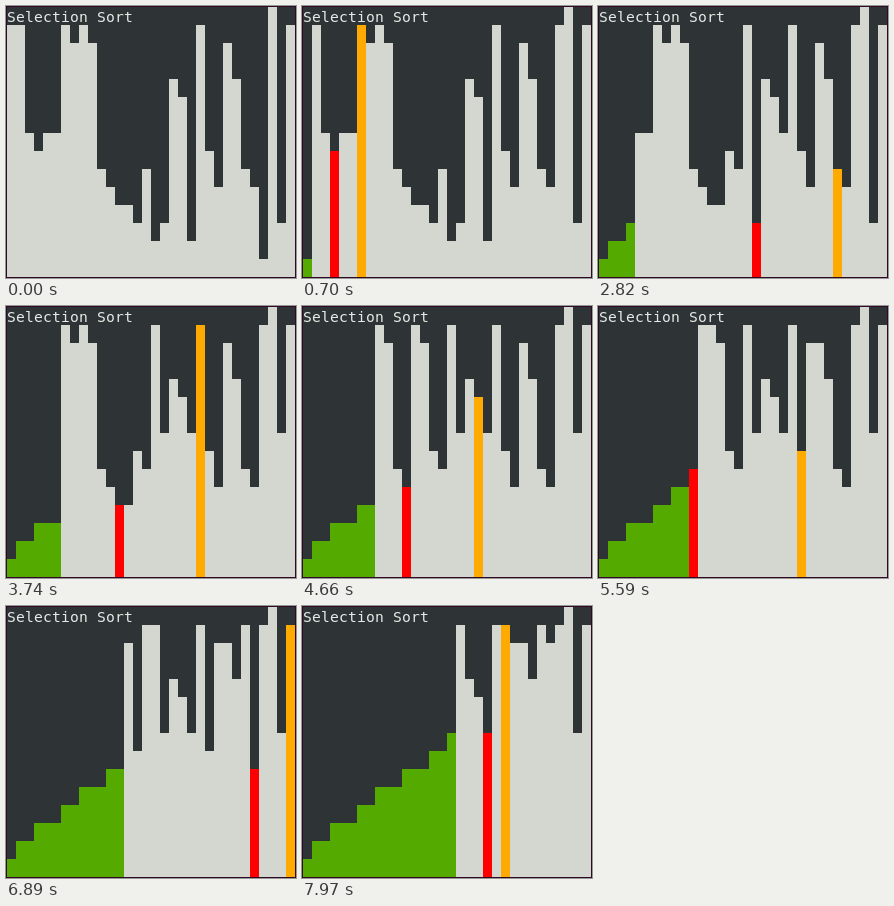
Animation of 290 by 272 pixels, one loop 8000 ms. Source, as an HTML page with a canvas:

```html
<!DOCTYPE html>
<html lang="en">
<head>
<meta charset="utf-8">
<title>Selection Sort</title>
<style>
  html, body { margin: 0; width: 100%; height: 100%; overflow: hidden; background: #300a24; }
  canvas { display: block; }
</style>
</head>
<body>
<canvas id="stage" width="290" height="272"></canvas>
<script>
const ctx = document.getElementById('stage').getContext('2d');

const LOOP = 8000, REFRESH = 42;
const CELL_W = 9, CELL_H = 18, ROWS = 15, EDGE = 1;
const COLORS = {
  border: '#300a24', back: '#2e3436', text: '#e6eae6', bar: '#d3d7cf',
  sorted: '#55aa00', min: '#ff0000', cursor: '#ffaa00'
};

// One hexadecimal digit per bar: the unsorted heights in rows.
const START = [...'ee8788eded6544362' + '3ba2e75db651f3e'].map(h => parseInt(h, 16));

// Slightly more than two comparisons per screen refresh, at a gently drifting pace.
function comparisonsAt(ms) {
  const n = Math.floor(ms / REFRESH + 0.34);
  if (n === 0) return 0;
  const drift = 0.45 * Math.sin((n - 143) / 13.4);
  return Math.floor(1 + n * (2 + 1 / 12) + drift);
}

// Runs the sort until the given comparison is about to be made.
function sortUntil(count) {
  const a = START.slice();
  if (count === 0) return { a, i: 0, min: -1, j: -1 };
  for (let i = 0; i < a.length; i++) {
    let min = i;
    for (let j = i + 1; j < a.length; j++) {
      if (--count === 0) return { a, i, min, j };
      if (a[j] < a[min]) min = j;
    }
    [a[i], a[min]] = [a[min], a[i]];
  }
  return { a, i: a.length, min: -1, j: -1 };
}

function barColor(k, { i, min, j }) {
  if (k === j) return COLORS.cursor;
  if (k === min) return COLORS.min;
  return k < i ? COLORS.sorted : COLORS.bar;
}

// Terminal text: every character starts on its own cell.
function drawTitle(text) {
  ctx.font = '11pt "DejaVu Sans Mono", monospace';
  ctx.textBaseline = 'alphabetic';
  ctx.fillStyle = COLORS.text;
  [...text].forEach((ch, k) => ctx.fillText(ch, EDGE + k * CELL_W, 16));
}

function draw(ms) {
  const state = sortUntil(comparisonsAt(ms));
  ctx.fillStyle = COLORS.border;
  ctx.fillRect(0, 0, 290, 272);
  ctx.fillStyle = COLORS.back;
  ctx.fillRect(EDGE, EDGE, START.length * CELL_W, ROWS * CELL_H);
  state.a.forEach((h, k) => {
    ctx.fillStyle = barColor(k, state);
    ctx.fillRect(EDGE + k * CELL_W, EDGE + (ROWS - h) * CELL_H, CELL_W, h * CELL_H);
  });
  drawTitle('Selection Sort');
}

const begin = performance.now();
function tick() {
  draw((performance.now() - begin) % LOOP);
  requestAnimationFrame(tick);
}
tick();
</script>
</body>
</html>
```
